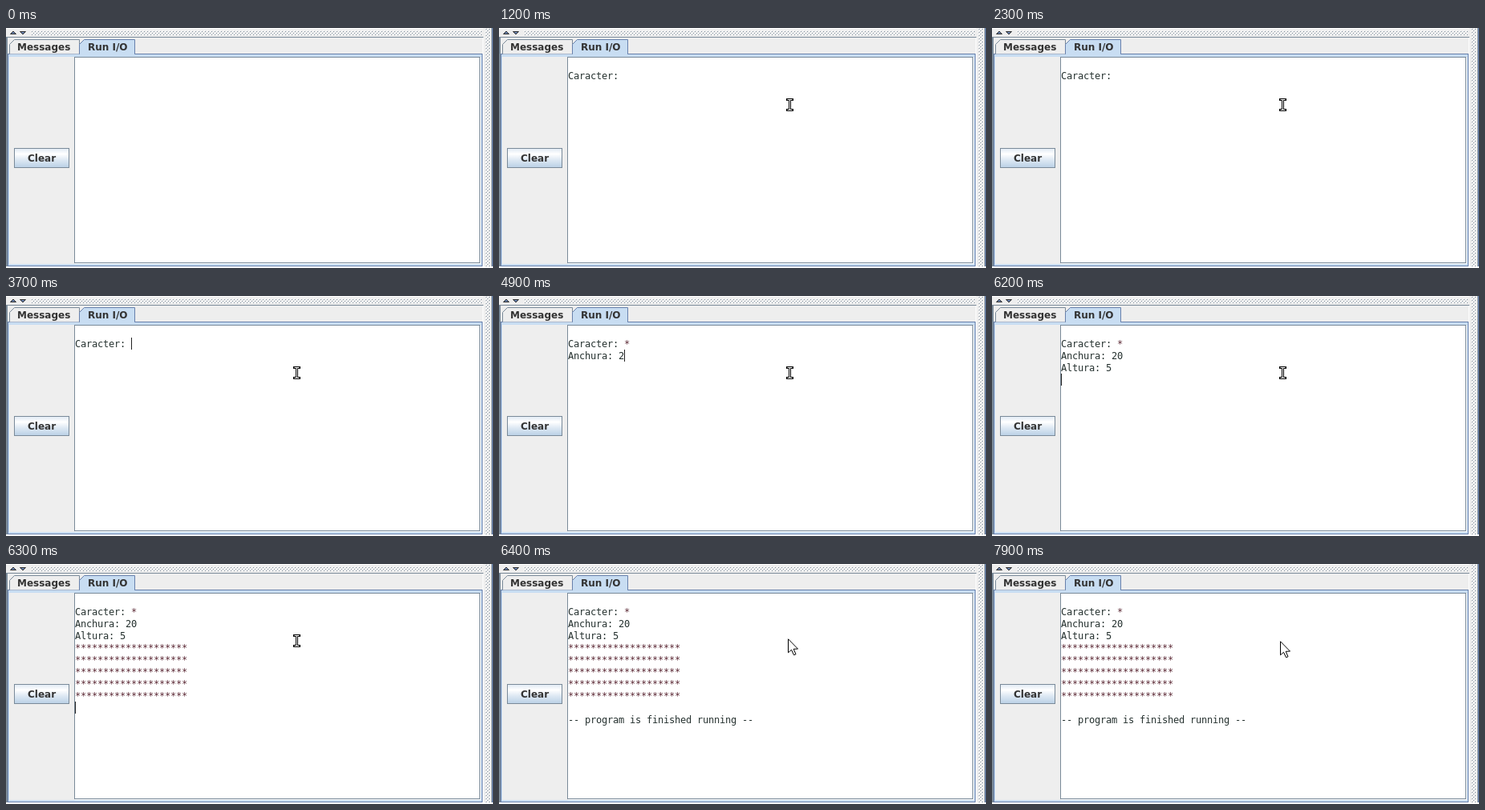
Write an HTML page with a canvas that moves like this. It is 607 px wide and 300 px high and loops after 8 s.

```html
<!DOCTYPE html>
<html lang="es">
<head>
<meta charset="utf-8">
<style>
  html, body { margin: 0; height: 100%; overflow: hidden; background: #eee; }
  canvas { display: block; }
</style>
</head>
<body>
<canvas id="stage" width="607" height="300"></canvas>
<script>
const ctx = document.getElementById('stage').getContext('2d', { alpha: false });
const LOOP = 8000;
const BLUE = '#6780ac', GREY = '#7a8a99', PALE = '#c8ddf2', PANEL = '#eee';
const CELL = { x: 86, y: 37, w: 7, h: 15 };

const ask1 = '\nCaracter: ', ask2 = ask1 + '*\nAnchura: ', ask3 = ask2 + '20\nAltura: ';
const stars = ask3 + '5\n' + ('*'.repeat(20) + '\n').repeat(5);
const done = stars + '\n-- program is finished running --';

// [start ms, console text, caret visible]
const steps = [
  [0, '', false], [700, ask1, true], [1200, ask1, false], [1800, ask1, true],
  [2300, ask1, false], [2900, ask1, true], [3500, ask1, false], [3700, ask1, true],
  [3800, ask2, true], [4300, ask2, false], [4900, ask2 + '2', true], [5000, ask2 + '20', true],
  [5300, ask2 + '20\n', true], [5400, ask3, true], [6000, ask3 + '5', true],
  [6200, ask3 + '5\n', true], [6300, stars, true], [6400, done, false]
];

function rect(x, y, w, h, color) {
  ctx.fillStyle = color;
  ctx.fillRect(x, y, w, h);
}

function shape(points, fill, stroke, closed = true) {
  ctx.beginPath();
  points.forEach(([x, y]) => ctx.lineTo(x, y));
  if (closed) ctx.closePath();
  ctx.fillStyle = fill;
  ctx.fill();
  ctx.strokeStyle = stroke;
  ctx.lineWidth = 1;
  ctx.stroke();
}

function label(text, x, y) {
  ctx.font = 'bold 12px "DejaVu Sans", sans-serif';
  ctx.fillStyle = '#333';
  ctx.fillText(text, x, y);
}

function bumps(x, y, w, h) {
  for (let j = 0; j < h; j += 2) {
    for (let i = j % 4; i < w; i += 4) {
      rect(x + i, y + j, 1, 1, '#fff');
      rect(x + i + 1, y + j + 1, 1, 1, GREY);
    }
  }
}

function tab(left, right, fill, border) {
  shape([[left + .5, 32.5], [left + .5, 20.5], [left + 6.5, 14.5], [right - .5, 14.5], [right - .5, 32.5]],
    fill, border, false);
}

function drawWindow() {
  rect(0, 0, 607, 300, PANEL);

  // Split bars
  rect(0, 0, 595, 1, '#fff');
  bumps(31, 3, 562, 6);
  rect(0, 11, 595, 1, GREY);
  shape([[5.5, 7.5], [9, 4], [12.5, 7.5]], BLUE, '#333');
  shape([[17.5, 4.5], [21, 8], [24.5, 4.5]], BLUE, '#333');
  bumps(597, 0, 6, 300);
  rect(605, 0, 1, 300, GREY);
  rect(606, 0, 1, 300, BLUE);

  // Tabbed pane
  rect(0, 11, 2, 287, GREY);
  rect(2, 32, 592, 266, BLUE);
  rect(3, 33, 590, 264, PALE);
  rect(4, 36, 588, 259, PANEL);
  rect(594, 12, 1, 287, '#fff');
  rect(0, 298, 607, 2, '#fff');
  tab(4, 92, PANEL, GREY);
  tab(91, 161, PALE, BLUE);
  rect(92, 32, 68, 1, PALE);
  label('Messages', 14, 28);
  label('Run I/O', 102, 28);

  // Clear button
  const shine = ctx.createLinearGradient(0, 150, 0, 175);
  shine.addColorStop(0, '#dde8f3');
  shine.addColorStop(.3, '#fff');
  shine.addColorStop(.6, '#dde8f3');
  shine.addColorStop(1, '#b8cfe5');
  rect(10, 150, 69, 25, GREY);
  rect(11, 151, 67, 23, shine);
  label('Clear', 27, 167);

  // Console area
  rect(86, 37, 506, 258, '#fff');
  rect(85, 36, 506, 258, GREY);
  rect(86, 37, 504, 256, '#fff');
}

function drawConsole(text, caret) {
  const lines = text.split('\n');
  ctx.font = '12px "DejaVu Sans Mono", monospace';
  lines.forEach((line, row) => [...line].forEach((char, col) => {
    ctx.fillStyle = char === '*' ? '#5c2a36' : '#24302e';
    ctx.fillText(char, CELL.x + col * CELL.w, CELL.y + row * CELL.h + 12);
  }));
  if (caret) {
    const row = lines.length - 1;
    rect(CELL.x + lines[row].length * CELL.w, CELL.y + row * CELL.h, 1, CELL.h, '#222');
  }
}

function drawBeam(x, y) {
  for (const [color, width, cap] of [['#000', 3, 'square'], ['#fff', 1, 'butt']]) {
    ctx.strokeStyle = color;
    ctx.lineWidth = width;
    ctx.lineCap = cap;
    ctx.beginPath();
    for (const dy of [-6.5, 6.5]) {
      ctx.moveTo(x - 3, y + dy);
      ctx.lineTo(x + 3, y + dy);
    }
    ctx.moveTo(x, y - 6.5);
    ctx.lineTo(x, y + 6.5);
    ctx.stroke();
  }
  ctx.lineCap = 'butt';
}

function drawArrow(x, y) {
  const outline = [[0, 0], [0, 17], [4, 13.5], [7, 20], [9.5, 19], [6.7, 12.5], [12, 12.3]];
  shape(outline.map(([dx, dy]) => [x + dx + .5, y + dy + .8]), '#fff', '#000');
}

function frame(now) {
  const t = now % LOOP;
  const [, text, caret] = steps.findLast(([start]) => start <= t);
  drawWindow();
  drawConsole(text, caret);
  if (t >= 7900) drawArrow(359, 96);
  else if (t >= 7800) drawArrow(359, 98);
  else if (t >= 6400) drawArrow(360, 93);
  else if (t >= 1200) drawBeam(362.5, 96);
  requestAnimationFrame(frame);
}

requestAnimationFrame(frame);
</script>
</body>
</html>
```
